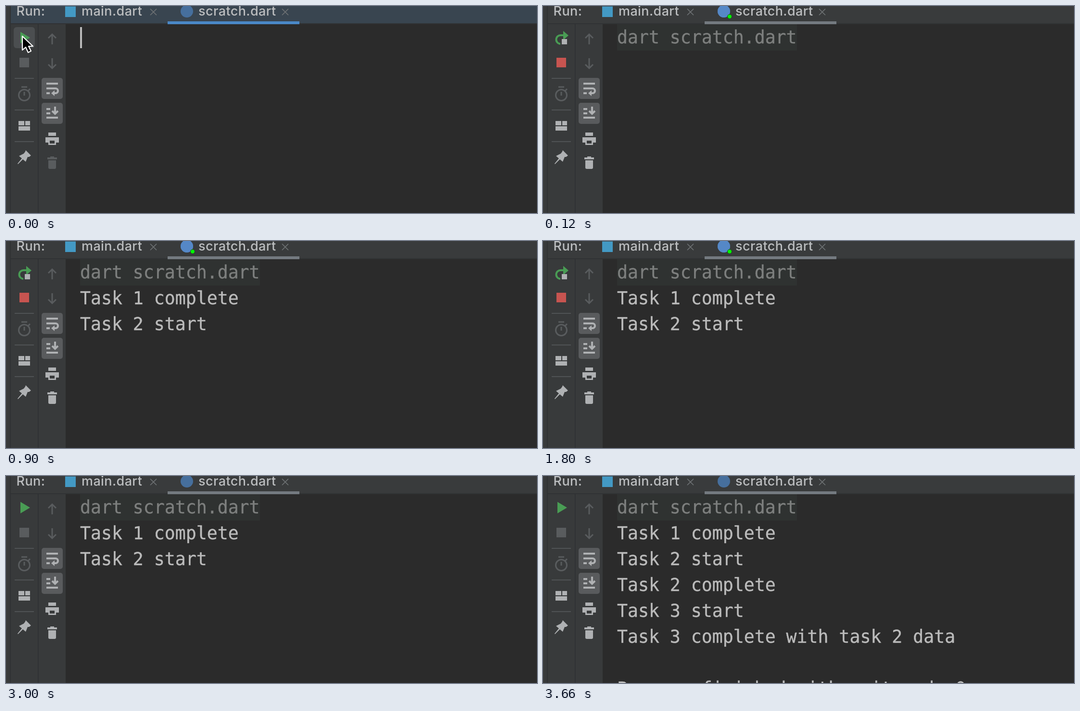
These frames come from a looping animation (1104 px wide and 432 px high, 4.38 s). An HTML page:

```html
<!DOCTYPE html>
<html lang="en">
<head>
<meta charset="utf-8">
<title>Run console</title>
<style>
  html, body { margin: 0; width: 100%; height: 100%; overflow: hidden; background: #2b2b2b; }
  svg { display: block; width: 1104px; height: 432px; }
  .tab { font: 500 27px Inter, sans-serif; fill: #bbbdbf; letter-spacing: .4px; }
  .out { font: 36.5px "DejaVu Sans Mono", monospace; fill: #bbb; stroke: #bbb; stroke-width: .4; white-space: pre; }
  .command { fill: #7d7f7e; stroke: #7d7f7e; }
  .line { fill: none; stroke: #afb1b3; stroke-width: 4; }
  .off { fill: none; stroke: #595c5e; stroke-width: 3; }
  .icon { fill: #afb1b3; }
  .dim { fill: #595c5e; }
  .close { fill: none; stroke: #6f7375; stroke-width: 1.7; }
</style>
</head>
<body>
<!-- data-show lists the start and end (ms) of each time an element is visible -->
<svg viewBox="0 0 1104 432">
  <rect width="1104" height="432" fill="#2b2b2b"/>
  <rect width="124" height="432" fill="#383a3b"/>
  <rect x="10" width="1094" height="36" fill="#393b3c"/>
  <rect x="10" width="1094" height="36" fill="#394550" data-show="0 60"/>
  <rect x="613" width="491" height="36" fill="#394550" data-show="60 120"/>
  <path d="M10 36h1094v2H10zM8 0h2v432h-2zM66 38h2v394h-2z" fill="#303234"/>
  <rect x="336" y="32" width="274" height="6" fill="#747a80"/>
  <rect x="336" y="32" width="274" height="6" fill="#4a88c7" data-show="0 60"/>

  <!-- tabs -->
  <g class="tab">
    <text x="21.5" y="20">Run:</text>
    <text x="157" y="20">main.dart</text>
    <text x="400" y="20">scratch.dart</text>
  </g>
  <rect x="123" y="1" width="22" height="22" fill="#4399c4"/>
  <circle cx="376" cy="11" r="13" fill="#466f9d"/>
  <g data-show="60 2940">
    <circle cx="376" cy="11" r="13" fill="#5588c7"/>
    <circle cx="388" cy="22" r="4.5" fill="#0f0" stroke="#263a26"/>
  </g>
  <path class="close" d="M300 6l13 13m0-13l-13 13M574 6l13 13m0-13l-13 13"/>

  <!-- run column -->
  <rect x="16" y="44" width="44" height="44" rx="6" fill="#4b4e50" data-show="0 120"/>
  <g data-show="0 60 3000 4380">
    <path d="M30 54l20 12-20 12z" fill="#499c54"/>
    <rect class="dim" x="28" y="108" width="20" height="20"/>
  </g>
  <g data-show="60 3000">
    <path d="M36 79A9 9 0 0 1 37 61H44" fill="none" stroke="#499c54" stroke-width="4"/>
    <path d="M42 52l11 9.5-11 9.5z" fill="#499c54"/>
    <rect class="icon" x="39" y="69" width="11" height="11"/>
    <rect x="28" y="108" width="20" height="20" fill="#c75450"/>
  </g>
  <path d="M18 151h40M18 217h40M18 283h40" stroke="#505355" stroke-width="2"/>
  <g class="off">
    <circle cx="38" cy="186" r="11.5"/>
    <path d="M32 169h12M38 179v8M46 177l4-4"/>
  </g>
  <path class="icon" d="M26 240h12v9H26zM40 240h10v9H40zM26 251h24v9H26z"/>
  <path class="icon" d="M41 301l11 11-4 3h-3l-4 10-6-5-10 10-1-1 9-11-6-5 10-5 3-4z"/>

  <!-- console column -->
  <path class="off" d="M96 80V59m-8 8l8-8 8 8M96 109v21m-8-8l8 8 8-8"/>
  <g fill="#595b5d">
    <rect x="74" y="150" width="44" height="44" rx="5"/>
    <rect x="74" y="202" width="44" height="44" rx="5"/>
  </g>
  <path class="line" d="M84 162h24M84 172h19a5 5 0 0 1 0 10h-4M84 182h7"/>
  <path class="icon" d="M94 182l7-6v12z"/>
  <path class="line" d="M84 215h8M84 224h8M84 233h24M102 210v14m-6-5l6 6 6-6"/>
  <path class="icon" fill-rule="evenodd" d="M88 264h16v7H88zM82 274h28v11h-6v5H88v-5h-6zM91 281h10v6H91z"/>
  <path id="bin" class="dim" d="M92 314h8v2h6v4H86v-4h6zM88 322h16v15q0 3-3 3H91q-3 0-3-3z"/>

  <!-- output -->
  <rect x="154" y="44" width="4" height="44" fill="#bbb" data-show="0 60"/>
  <rect x="154" y="38" width="374" height="55" fill="#2f3231" data-show="60 4380"/>
  <g id="log"></g>

  <path id="mouse" d="M34 63v29l7-6 5 11 6-3-5-10h9z" fill="#000" stroke="#fff" stroke-width="2.2" stroke-linejoin="round" data-show="0 120"/>
</svg>
<script>
  const LOOP = 4380, LINE = 54;
  const $ = id => document.getElementById(id);

  const log = [
    [60, 'dart scratch.dart'],
    [420, 'Task 1 complete'],
    [420, 'Task 2 start'],
    [3120, 'Task 2 complete'],
    [3120, 'Task 3 start'],
    [3120, 'Task 3 complete with task 2 data'],
    [3120, ''],
    [3120, 'Process finished with exit code 0']
  ];
  log.forEach(([start, words], i) => {
    const text = document.createElementNS('http://www.w3.org/2000/svg', 'text');
    text.setAttribute('class', i ? 'out' : 'out command');
    text.setAttribute('x', 154);
    text.setAttribute('y', 78 + i * LINE);
    text.dataset.show = `${start} ${LOOP}`;
    text.textContent = words;
    $('log').append(text);
  });

  const timed = [...document.querySelectorAll('[data-show]')].map(el => ({
    el, times: el.dataset.show.split(' ').map(Number)
  }));

  function draw(now) {
    const t = now % LOOP;
    for (const { el, times } of timed) {
      const passed = times.filter(time => time <= t).length;
      el.style.display = passed % 2 ? '' : 'none';
    }
    $('bin').setAttribute('class', t < 60 ? 'dim' : 'icon');
    $('mouse').setAttribute('transform', t < 60 ? '' : 'translate(-22 3)');
  }

  const start = performance.now();
  function tick() {
    draw(performance.now() - start);
    requestAnimationFrame(tick);
  }
  tick();
</script>
</body>
</html>
```
